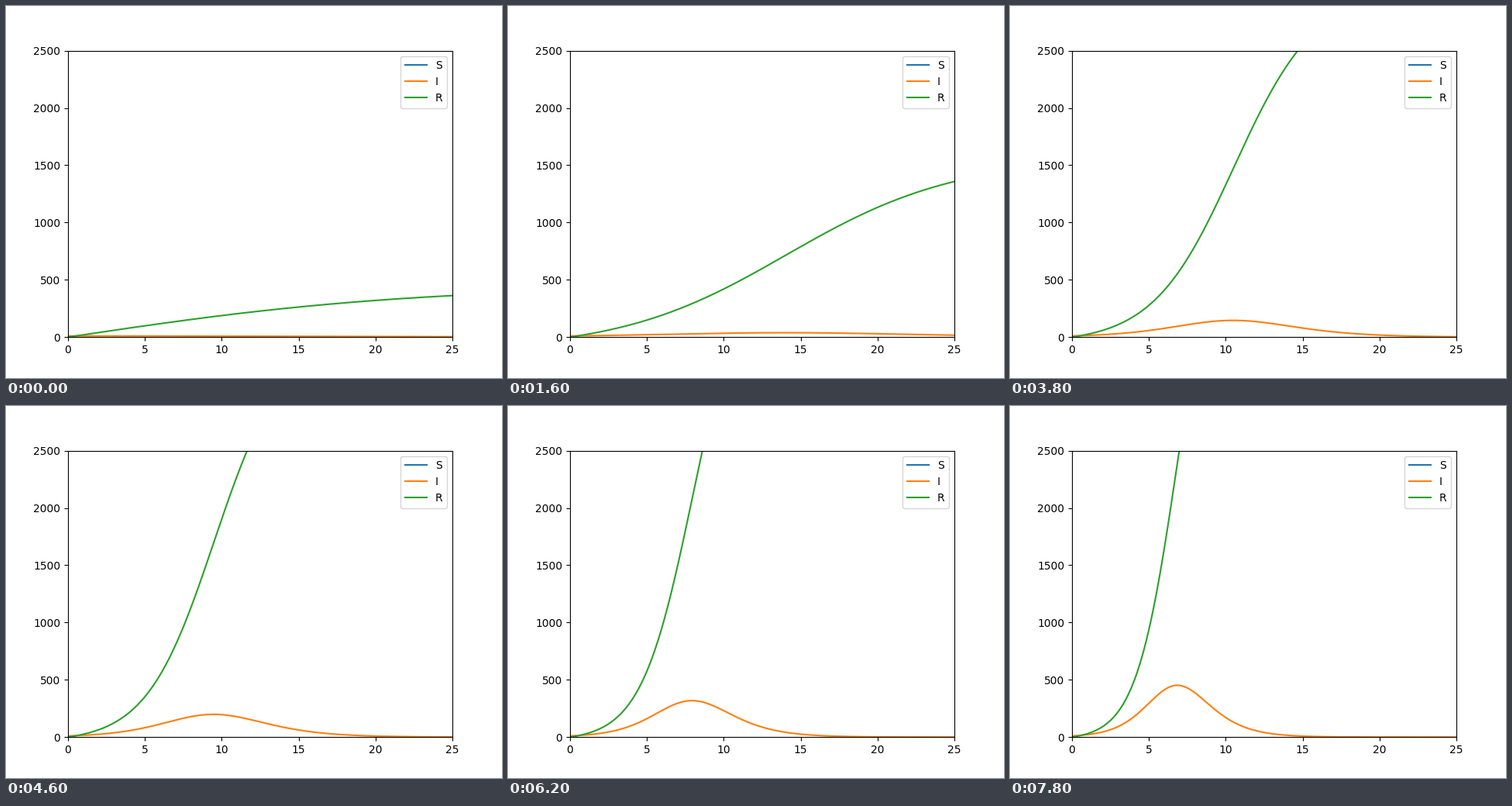
A matplotlib script that plays this animation: 640x480 px, repeating every 8 s.

```python
import numpy as np
import matplotlib.pyplot as plt
from matplotlib.animation import FuncAnimation

FRAMES, INTERVAL = 40, 200
N = 10000
GAMMA = 2.0
T_MAX, DT = 25, 0.05
t = np.linspace(0, T_MAX, int(T_MAX / DT) + 1)


def simulate(beta):
    """Euler steps of the SIR model; rows are S, I and R."""
    out = np.empty((3, t.size))
    s, i, r = N, 10.0, 0.0
    for k in range(t.size):
        out[:, k] = s, i, r
        infected = beta * s * i / N * DT
        recovered = GAMMA * i * DT
        s, i, r = s - infected, i + infected - recovered, r + recovered
    return out


fig, ax = plt.subplots(figsize=(6.4, 4.8), dpi=100)
ax.set_xlim(0, T_MAX)
ax.set_ylim(0, 2500)
lines = [ax.plot([], [], label=name)[0] for name in "SIR"]
ax.legend(loc="best")  # re-placed on every draw to avoid the curves


def update(frame):
    beta = GAMMA * (1 + 0.01 * frame)
    for line, values in zip(lines, simulate(beta)):
        line.set_data(t, values)
    return lines


anim = FuncAnimation(fig, update, frames=FRAMES, interval=INTERVAL,
                     init_func=lambda: update(0), repeat=True,
                     repeat_delay=0, blit=False)
plt.show()
```
